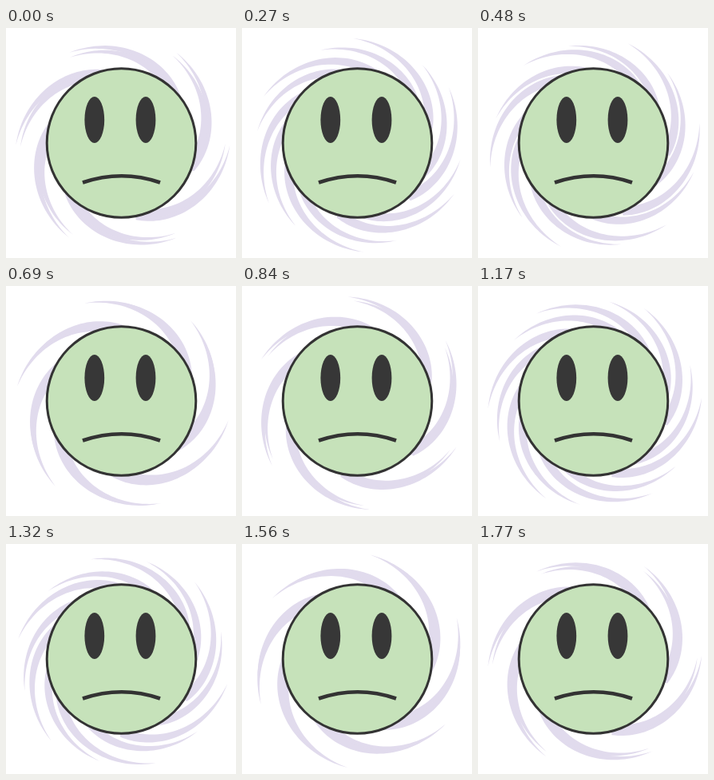
Animation of 288 by 288 pixels, one loop 1800 ms. Source, as an HTML page:

```html
<!DOCTYPE html>
<html lang="en">
<head>
<meta charset="utf-8">
<title>Dizzy face</title>
<style>
  html, body { margin: 0; width: 100%; height: 100%; overflow: hidden; background: #fff; }
  svg { display: block; width: 100vw; height: 100vh; }
</style>
</head>
<body>
<svg viewBox="0 0 288 288">
  <defs>
    <path id="arm"/>
    <g id="swirl"></g>
  </defs>
  <g fill="#e1dbed" transform="translate(146.3 146.8)">
    <use id="fast" href="#swirl"/>
    <use id="slow" href="#swirl"/>
  </g>
  <circle cx="144.5" cy="144" r="93.3" fill="#c6e2ba" stroke="#333" stroke-width="3"/>
  <g fill="#373737">
    <ellipse cx="110.8" cy="115" rx="12.4" ry="29"/>
    <ellipse cx="175" cy="115" rx="12.4" ry="29"/>
  </g>
  <path d="M96 193.5Q145 177 193 193.5" fill="none" stroke="#333" stroke-width="4.6"/>
</svg>
<script>
const LOOP = 1800, STEP = 30;
const TIP = 134, SWEEP = 80;
const byId = id => document.getElementById(id);

// Radius of each arm edge, a given number of degrees behind its tip
const outer = a => TIP - 0.33 * a - 0.002 * a * a;
const inner = a => TIP - 0.57 * a - 0.001 * a * a;

function point(edge, deg) {
  const r = edge(deg), a = deg * Math.PI / 180;
  return `${(r * Math.cos(a)).toFixed(2)} ${(r * Math.sin(a)).toFixed(2)}`;
}

const points = [];
for (let a = 0; a <= SWEEP; a += 2) points.push(point(outer, a));
for (let a = SWEEP; a > 0; a -= 2) points.push(point(inner, a));
byId('arm').setAttribute('d', `M${points.join('L')}Z`);

byId('swirl').innerHTML = [0, 60, 120, 180, 240, 300]
  .map(a => `<use href="#arm" transform="rotate(${a})"/>`).join('');

const pose = (id, angle, scale) =>
  byId(id).setAttribute('transform', `rotate(${angle}) scale(${scale})`);

const start = performance.now();

function draw(now) {
  const elapsed = Math.max(0, now - start) % LOOP;
  const p = Math.floor(elapsed / STEP) * STEP / LOOP;
  // Whole multiples of the 60 degree arm spacing close the loop
  pose('fast', 180 * p, 1);
  pose('slow', 60 * p - 1, 0.958);
  requestAnimationFrame(draw);
}
draw(start);
</script>
</body>
</html>
```
